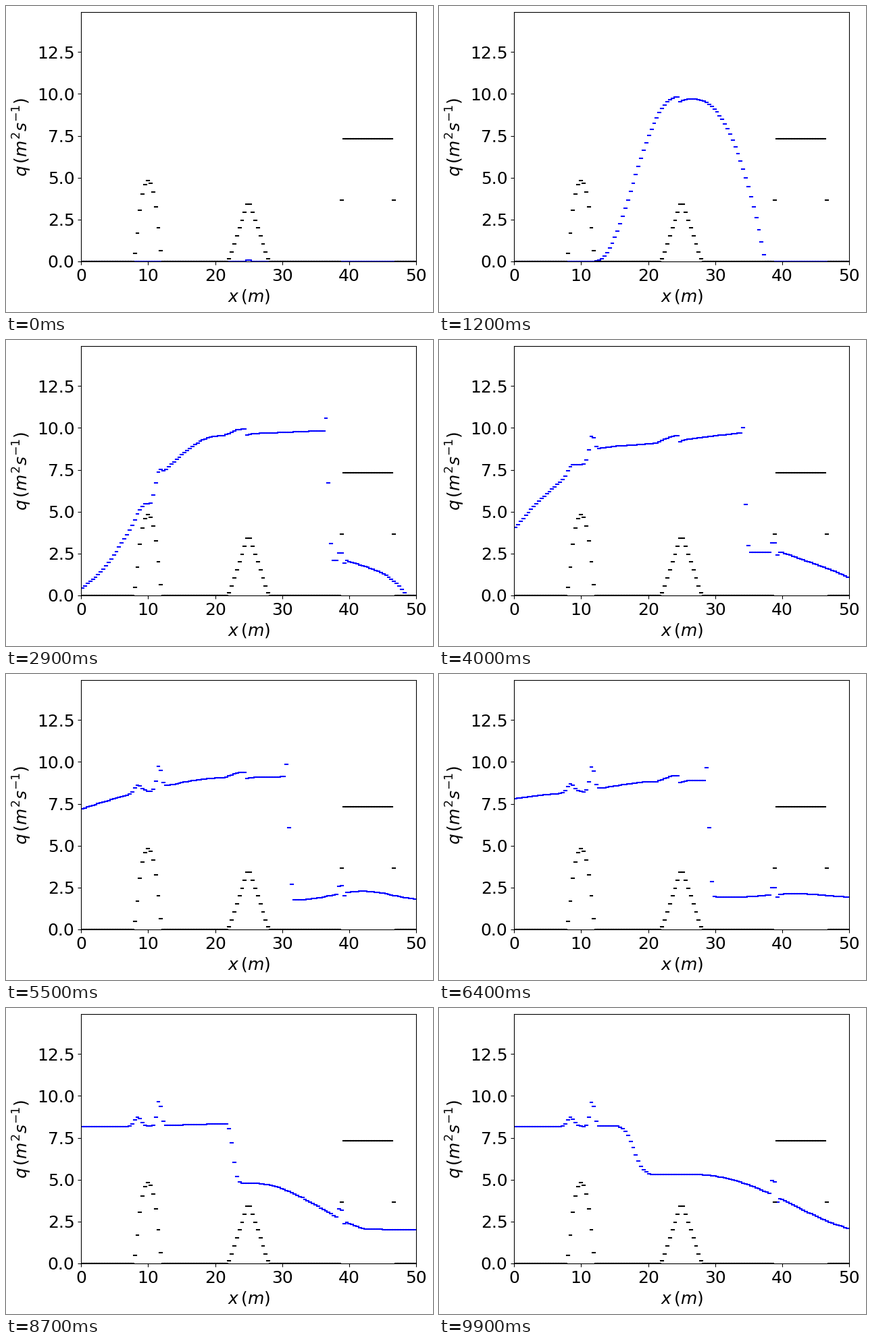
These frames come from a looping animation (632x454 px, 10 s). A matplotlib script:

```python
import numpy as np
import matplotlib.pyplot as plt
from matplotlib.animation import FuncAnimation

W, H, DPI = 632, 454, 100
FRAMES, STEP = 100, 100          # frame count, ms per frame
CELLS, LENGTH, TOP = 128, 50.0, 14.88
DX = LENGTH / CELLS
DAM, WALL = 24.61, 39.0
T_MERGE = 2.9                    # dam wave has become the upstream flow
edges = np.arange(CELLS + 1) * DX
xc = (edges[:-1] + edges[1:]) / 2

# Smooth upstream discharge: a few places (columns) at a few times (rows)
UP_X = np.array([0, 3.4, 7.2, 13, 20, 34])
UP_T = np.array([T_MERGE, 4, 5.5, 7.4, 9.9])
UP_Q = np.array([
    [0.36, 1.60, 3.85, 7.65, 9.50, 9.80],
    [3.95, 5.50, 6.88, 8.80, 9.05, 9.72],
    [7.17, 7.62, 8.03, 8.60, 9.03, 9.14],
    [8.13, 8.16, 8.18, 8.30, 8.48, 8.75],
    [8.18, 8.18, 8.18, 8.20, 8.20, 8.20],
])
BORE_T = [1.5, 1.9, 2.9, 5.5, 7.4, 8, 9.9]
BORE_X = [38.8, 38.56, 36.98, 31.11, 27, 25.4, 17.9]


def bell(x, mid, width):
    return np.exp(-((x - mid) / width) ** 2)


def ramp(x, a, b):
    return np.clip((x - a) / (b - a), 0, 1)


def curve(x, xs, ys):
    """Monotone cubic through the rows of ys."""
    h = np.diff(xs).reshape(-1, *[1] * (ys.ndim - 1))
    d = np.diff(ys, axis=0) / h
    prod, total = d[:-1] * d[1:], d[:-1] + d[1:]
    inner = np.where(prod > 0, 2 * prod / np.where(prod > 0, total, 1), 0)
    m = np.concatenate([d[:1], inner, d[-1:]])
    i = np.clip(np.searchsorted(xs, x, side="right") - 1, 0, len(xs) - 2)
    k = h[i]
    u = (x - xs[i]) / k
    return ((1 + 2 * u) * (1 - u) ** 2 * ys[i] + u * (1 - u) ** 2 * k * m[i]
            + u * u * (3 - 2 * u) * ys[i + 1] + u * u * (u - 1) * k * m[i + 1])


def bed(x):
    """Parabolic bump, triangular bump and plateau."""
    z = np.maximum(0, 1 - ((x - 10) / 2) ** 2)
    z += 0.75 * np.maximum(0, 1 - np.abs(x - 25) / 3)
    return 4.87 * (z + 1.5 * ((x >= WALL) & (x <= 46.6)))


def dam_wave(t):
    """Self-similar wave spreading from the dam over a dry bed."""
    u = (xc - DAM) * 1.2 / t
    left = 9.88 * np.maximum(0, 1 - (np.abs(u) / 12.8) ** 2.2) ** 2.57
    right = 9.75 * np.maximum(0, 1 - (np.abs(u - 2) / 10.9) ** 2.3)
    return (1 - 0.25 * np.exp(-t / 0.3)) * np.where(u < 0, left, right)


def bump_ripples(t):
    """Disturbances that stay above the two bumps."""
    grow = 1 - np.exp(-(t - 2.2) / 1.7)
    first = (grow * (0.55 * bell(xc, 8.45, 0.75) + 1.55 * bell(xc, 11.65, 0.5))
             - 0.9 * (1 - grow) * bell(xc, 10.4, 0.6))
    second = np.where(xc < DAM, 0.3 * ramp(xc, 21.4, 23.4),
                      -0.1 * (1 - ramp(xc, DAM, DAM + 1.2)))
    return first + second


def settled(t):
    return curve(np.minimum(xc, UP_X[-1]), UP_X, curve(t, UP_T, UP_Q)) + bump_ripples(t)


def upstream(t):
    if t >= T_MERGE:
        return settled(t)
    mix = ramp(t, 1.2, T_MERGE)
    return dam_wave(t) * (settled(T_MERGE) / dam_wave(T_MERGE)) ** mix


def downstream(t):
    # sheet of water running over the plateau
    reach = max(6.33 * (t - 1.4), 0.01)
    r = np.clip((xc - WALL) / reach, 0.05, 1)
    rise = ramp(t, T_MERGE, 4)
    sheet = (2.15 + 0.55 * rise - (1.2 + 1.1 * rise) * r) * (1 - r ** 6) * (t > 1.4)
    # calm flow with a fading swell
    swell = 0.25 * min(1, np.exp(5.5 - t))
    calm = 2.02 + swell * np.cos(2 * np.pi * (xc - 42) / 19)
    # surge released when the bore climbs the second bump
    front = 28.4 + 6.9 * (t - 6.6)
    v = np.clip((front - xc) / (10 + 5.6 * (t - 7.4)), 0, 1) if t > 6.6 else 0 * xc
    surge = (2.2 + 0.43 * (t - 7.4)) * np.sin(np.pi / 2 * v) ** 1.5
    mix = ramp(t, 4, 5.5)
    q = (1 - mix) * sheet + mix * calm + surge
    # jump at the foot of the plateau
    return q * (1 + 0.21 * (np.abs(xc - 38.67) < DX) - 0.07 * (np.abs(xc - 39.26) < DX / 2))


def discharge(t):
    if t == 0:
        return 0.06 * (np.abs(xc - 25) < DX)
    d = (xc - np.interp(t, BORE_T, BORE_X)) / DX
    w = 1 / (1 + np.exp(d * np.interp(t, [7.4, 8.2, 9.9], [2.13, 1.6, 0.55])))
    w = np.clip((w - 0.02) / 0.95, 0, 1)
    if t < 8:
        w[d < -0.7] = 1
    # overshoot on the crest, strongest as the wave hits the wall
    peak = 0.82 * (1 + 8.4 * bell(t, 1.9, 0.12)) * ramp(t, 1.4, 1.6) * ramp(t, 8.2, 7.4)
    crest = peak * np.maximum(0, 1 - np.abs(d + 1.2) / 0.6)
    return np.clip(w * upstream(t) + (1 - w) * downstream(t) + crest, 0, TOP - 0.05)


def dashes(start, end):
    return np.column_stack([start, end, np.full(CELLS, np.nan)]).ravel()


plt.rcParams.update({"font.family": "DejaVu Sans", "font.size": 18})
fig = plt.figure(figsize=(W / DPI, H / DPI), dpi=DPI, facecolor="white")
ax = fig.add_axes([111.2 / W, 75.17 / H, 496 / W, 369.6 / H])
ax.set_xlim(0, LENGTH)
ax.set_ylim(0, TOP)
ax.set_xticks(range(0, 51, 10))
ax.set_yticks(np.arange(0, 13, 2.5))
ax.set_xlabel(r"$x \, (m)$")
ax.set_ylabel(r"$q \, (m^2 s^{-1})$")

dash_x = dashes(edges[:-1], edges[1:])
bed_q = (bed(edges[:-1]) + bed(edges[1:])) / 2
flow, = ax.plot(dash_x, 0 * dash_x, color="blue", lw=1.5)
ax.plot(dash_x, dashes(bed_q, bed_q), color="black", lw=1.5)


def update(n):
    q = discharge(n * STEP / 1000)
    flow.set_ydata(dashes(q, q))
    return flow,


anim = FuncAnimation(fig, update, frames=FRAMES, interval=STEP, repeat=True)
plt.show()
```
